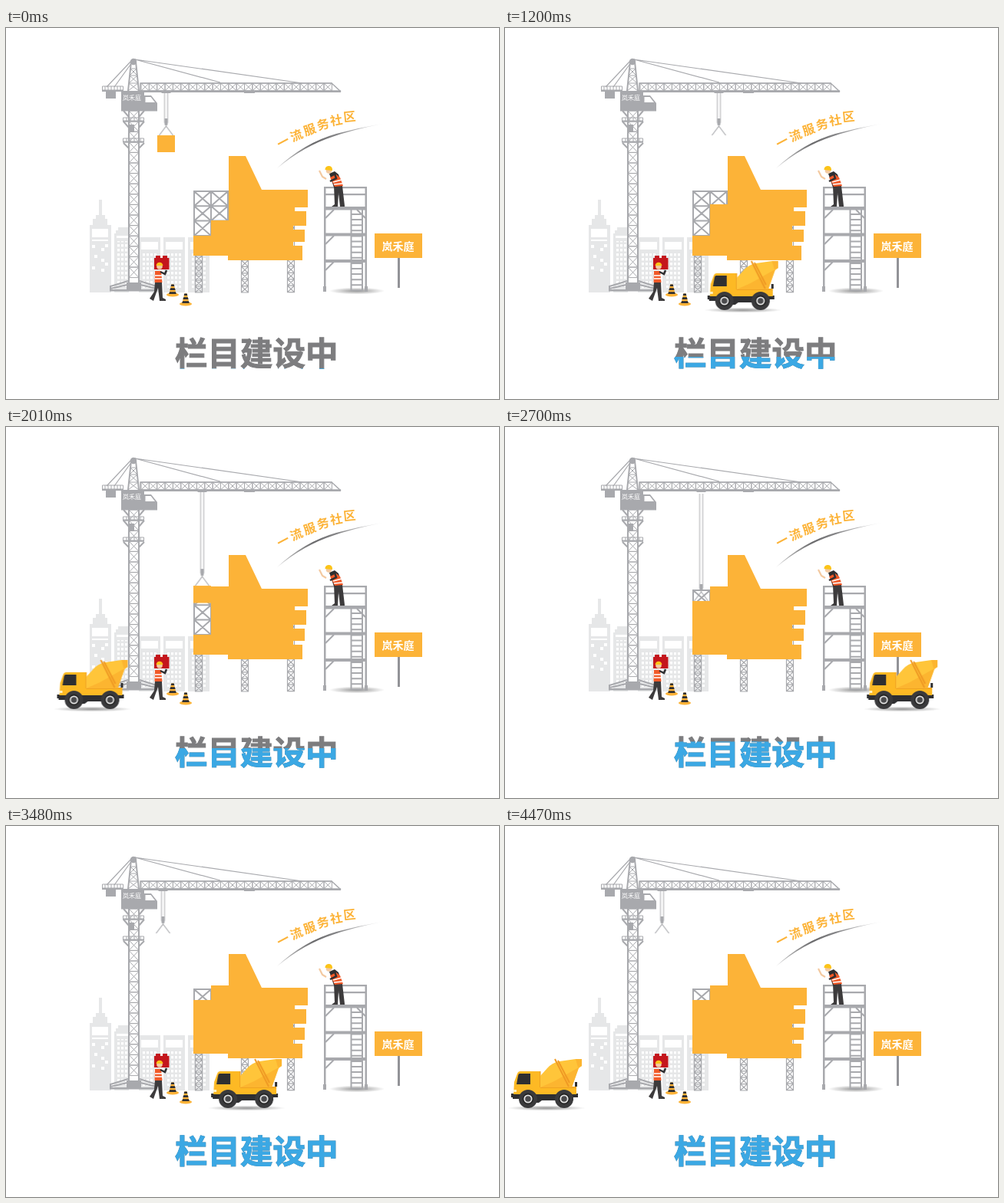
Recreate the animation shown at these times as an HTML page. Size 642 px wide and 484 px high, loop 4.5 s.

```html
<!DOCTYPE html>
<html lang="zh">
<head>
<meta charset="utf-8">
<title>栏目建设中</title>
<style>
html, body { margin: 0; width: 100%; height: 100%; overflow: hidden; background: #fff; }
svg { display: block; width: 100vw; height: 100vh; }
text { font-family: "Noto Sans CJK SC", "Noto Sans CJK", "Noto Sans", sans-serif; }
.steel { fill: none; stroke: #a8a9ad; }
.iron { fill: #a8a9ad; }
.city { fill: #e6e7e8; }
.gold { fill: #fcb338; }
.dark { fill: #2f2f31; }
.cloth { fill: #3d3b3c; }
.title { font-size: 42.5px; font-weight: 900; }

/* One picture every 30 ms; a small lead keeps each step clear of its boundary. */
.trolley, .hook, .block, .truck, .level { animation: 4500ms -2ms infinite step-end; }
.trolley { animation-name: trolley; }
.hook { animation-name: hook; }
.a { animation-name: a; }
.b { animation-name: b; }
.c { animation-name: c; }
.d { animation-name: d; }
.truck { animation-name: truck; }
.level { animation-name: level; }

@keyframes trolley {
  0% { transform: translateX(208.5px); animation-timing-function: steps(14); }
  9.3333% { transform: translateX(278.5px); }
  36% { transform: translateX(278.5px); animation-timing-function: steps(5); }
  39.3333% { transform: translateX(255.5px); }
  66.6667% { transform: translateX(255.5px); animation-timing-function: steps(10); }
  73.3333%, 100% { transform: translateX(204.5px); }
}
@keyframes hook {
  0% { transform: translateY(0); }
  9.3333% { transform: translateY(0); animation-timing-function: steps(13); }
  18% { transform: translateY(90px); animation-timing-function: steps(13); }
  26.6667% { transform: translateY(0); animation-timing-function: steps(7); }
  31.3333% { transform: translateY(68px); animation-timing-function: steps(7); }
  36% { transform: translateY(0); }
  39.3333% { transform: translateY(0); animation-timing-function: steps(13); }
  48% { transform: translateY(109px); animation-timing-function: steps(8); }
  53.3333% { transform: translateY(0); animation-timing-function: steps(10); }
  60% { transform: translateY(87px); animation-timing-function: steps(10); }
  66.6667%, 100% { transform: translateY(0); }
}
@keyframes a {
  0% { transform: translate(197px, 140px); animation-timing-function: steps(14); }
  9.3333% { transform: translate(267px, 140px); animation-timing-function: steps(13); }
  18%, 100% { transform: translate(267px, 230px); }
}
@keyframes b {
  0% { transform: translate(-99px, 0); }
  27.3333% { transform: translate(267px, 149.7px); animation-timing-function: steps(6); }
  31.3333%, 100% { transform: translate(267px, 208px); }
}
@keyframes c {
  0% { transform: translate(-99px, 0); }
  40% { transform: translate(244px, 148.4px); animation-timing-function: steps(12); }
  48%, 100% { transform: translate(244px, 249px); }
}
@keyframes d {
  0% { transform: translate(-99px, 0); }
  54% { transform: translate(244px, 148.7px); animation-timing-function: steps(9); }
  60%, 100% { transform: translate(244px, 227px); }
}
@keyframes truck {
  0% { transform: translateX(-200px); }
  2% { transform: translateX(534px); animation-timing-function: steps(72); }
  50% { transform: translateX(8px); }
  50.6667% { transform: translateX(-200px); }
  54.6667% { transform: translateX(534px); animation-timing-function: steps(67); }
  99.3333%, 100% { transform: translateX(8px); }
}
@keyframes level {
  0% { transform: translateY(41px); animation-timing-function: steps(110); }
  73.3333%, 100% { transform: translateY(0); }
}
</style>
</head>
<body>
<svg viewBox="0 0 642 484">
  <defs>
    <pattern id="panes" width="5" height="6" patternUnits="userSpaceOnUse">
      <rect width="3" height="3.4" fill="#fff"/>
    </pattern>
    <clipPath id="rope"><rect x="-20" y="84" width="40" height="300"/></clipPath>
    <clipPath id="fill"><rect class="level" x="200" y="403" width="260" height="60"/></clipPath>
    <radialGradient id="shade">
      <stop offset=".1" stop-color="#000" stop-opacity=".38"/>
      <stop offset="1" stop-color="#000" stop-opacity="0"/>
    </radialGradient>
    <linearGradient id="brush">
      <stop offset="0" stop-color="#ccc"/>
      <stop offset=".35" stop-color="#6a6a6c"/>
      <stop offset=".6" stop-color="#8a8a8c"/>
      <stop offset="1" stop-color="#eee"/>
    </linearGradient>
    <g id="house">
      <path class="city" d="M0 273h28v72H0z"/>
      <path fill="#fff" d="M3 279h22v10H3z"/>
      <path fill="url(#panes)" d="M3 293h22v46H3z"/>
    </g>
    <g id="cone">
      <ellipse class="gold" cy="5.500" rx="8" ry="2.400"/>
      <path class="gold" d="M-1.600-8h3.200L5 6H-5z"/>
      <path class="dark" d="M-1.700-8h3.400l.6 2.400h-4.600zM-2.800-3.200h5.600l.8 2.800h-7.200zM-4 1.800h8l.8 2.600h-9.600z"/>
    </g>
    <g id="wheel">
      <circle r="12" fill="#3a3a3c"/>
      <circle r="7.200" fill="#222"/>
      <circle r="5.600" fill="#e4e4e4"/>
      <circle r="3.800" fill="#4a4a4c"/>
    </g>
  </defs>

  <!-- skyline -->
  <path class="city" d="M109 345v-88h4v-8h4v-5h4v-20h4v20h4v5h3v8h5v88zM141 345v-77h2v-4h3v-4h14v85z"/>
  <path fill="#fff" d="M112 262h21v11h-21zM112 276h21v2h-21zM144 271h16v3h-16z"/>
  <path fill="#fff" d="M112 283h4v4h-4zM129 282h4v4h-4zM124 287h4v4h-4zM115 296h4v4h-4zM124 301h4v4h-4zM112 311h4v4h-4zM129 306h4v4h-4zM124 314h4v4h-4z"/>
  <path fill="url(#panes)" d="M144 278h16v60h-16z"/>
  <use href="#house" x="173"/><use href="#house" x="205"/><use href="#house" x="237"/>

  <!-- crane -->
  <path id="mast" class="steel"/>
  <path class="steel" stroke-width="2" d="M160 108v225M173 108v225M163 44l-4 38M169 44l4 38"/>
  <path class="steel" d="M162 53h8M161 62h10M160 72h12M162 53l9 9-11 10 13 10M170 53l-9 9 11 10-13 10"/>
  <path class="steel" stroke-width="1.200" d="M168 41l111 30M168 41l218 31M163 43l-32 34M164 45l-23 32"/>
  <circle class="iron" cx="166" cy="44" r="4.200"/>
  <path id="jib" class="steel"/>
  <path class="steel" stroke-width="1.500" d="M175 82V72h249l12 11"/>
  <path class="iron" d="M173 81.200h263v2.800H173zM310 82h14v3h-14zM125 80.500h28v2.500h-28zM130 82h13v10h-13z"/>
  <path class="steel" d="M125.500 81v-5h27v5M129 76v5M133 76v5M137 76v5M141 76v5M145 76v5M149 76v5"/>
  <path class="iron" d="M150 82h30v6h9l8 10v10.500h-47z"/>
  <path fill="#fff" d="M181.500 90h7l5.500 7h-12.500z"/>
  <text x="164" y="93.500" font-size="8" text-anchor="middle" fill="#fff">岚禾庭</text>
  <path class="steel" stroke-width="2" d="M153 108l7 8M180 108l-7 8M153 122l7 8M180 122l-7 8M153 150l7 7M180 150l-7 7"/>
  <path class="steel" d="M152.500 122v-5h27v5zM152.500 149v-5h27v5zM157 117v5M162 117v5M167 117v5M175 117v5M157 144v5M162 144v5M167 144v5M175 144v5"/>
  <path class="iron" d="M152 120.500h28v2h-28zM152 147.500h28v2h-28zM159 126h8v10h-8zM135 341h62v2.500h-62zM157 332h19v10h-19z"/>
  <path class="steel" stroke-width="2" d="M159 330l-23 7v6M174 330l22 7v6M158 335l-22 5M175 335l21 5"/>

  <!-- scaffold -->
  <path id="frame" class="steel" stroke-width="2"/>
  <path id="legs" class="steel" stroke-width="1.200"/>

  <g class="trolley">
    <path class="iron" d="M-6 82H6v3H-6z"/>
    <g clip-path="url(#rope)">
      <g class="hook">
        <path class="steel" d="M-2 0v118M2 0v118"/>
        <path class="iron" d="M-2.500 118h5v5l-1 4h-3l-1-4z"/>
        <path class="steel" stroke-width="1.200" d="M0 126v2l-9 12M0 128l9 12"/>
      </g>
    </g>
  </g>
  <g class="gold">
    <rect class="block a" width="23" height="22"/>
    <rect class="block b" width="23" height="22.500"/>
    <rect class="block c" width="23" height="22.500"/>
    <rect class="block d" width="23" height="22.500"/>
    <path d="M290 167h22l21 44h60v23h-17v5h15v19h-17v5h15v16h-15v5h12v19h-97v-6h-45v-26h23v-20h23z"/>
  </g>

  <!-- slogan -->
  <g id="slogan" class="gold" font-size="16" font-weight="700" text-anchor="middle"></g>
  <path fill="url(#brush)" d="M353 183Q388 150 430 138Q460 130 490 125Q450 133 425 142Q388 154 353 183z"/>

  <!-- lookout -->
  <ellipse cx="457" cy="343" rx="36" ry="4.500" fill="url(#shade)"/>
  <path id="ladder" class="steel" stroke-width="2"/>
  <path class="iron" d="M414 207h2.500v137H414zM467.500 207h2.500v137h-2.500zM414 207h56v2.200h-56zM414 216h56v2.200h-56zM414 233h56v4.500h-56zM414 267.500h56v4h-56zM414 302h56v4h-56zM413 337h4v7h-4zM467 337h4v7h-4z"/>
  <path class="steel" stroke-width="2" d="M416 248l11-11M468 248l-11-11M416 282l11-11M416 316l11-11"/>
  <g>
    <path fill="none" stroke="#f3c9a0" stroke-width="2.200" d="M408 186l4 8 5 3"/>
    <path class="cloth" d="M427 206h11l3 26v1h-6l-2-18-1 18h-8l4-3z"/>
    <path class="dark" d="M421 190l7-3 5 4 5 15-11 2z"/>
    <path fill="#f15a29" d="M422 195l8-4 5 4 4 11-11 1-2-4z"/>
    <path fill="none" stroke="#fff" stroke-width="1.500" d="M426 201l11-3M427 204l11-1"/>
    <path fill="none" stroke="#2f2f31" stroke-width="2.500" d="M428 190l2 6-8 4"/>
    <circle cx="420.500" cy="186" r="3.800" fill="#f3c9a0"/>
    <path fill="#fcc419" d="M415.500 185a4.800 5 0 0 1 9.500-1v2z"/>
  </g>

  <!-- sign -->
  <path fill="#929397" d="M510 300h3v39h-3z"/>
  <path class="gold" d="M480 268h62v32h-62z"/>
  <text x="510.500" y="290" font-size="14" font-weight="900" text-anchor="middle" fill="#fff">岚禾庭</text>

  <!-- carrier and cones -->
  <path fill="#c4161c" d="M193 300h2v-3h6v3h3v-3h6v3h2.500v15H193z"/>
  <path class="cloth" d="M194 331h9l1 21 4 2v2h-8l-2-17-6 17-5-3 6-9z"/>
  <path fill="#f15a29" d="M194 317h8l1.500 15h-10z"/>
  <path stroke="#fff" stroke-width="1.500" d="M194 323h9M194 327h9"/>
  <path fill="none" stroke="#2f2f31" stroke-width="2.500" d="M201 318l6 3 2-5"/>
  <circle cx="200" cy="311" r="3.800" fill="#f3c9a0"/>
  <path fill="#fcc419" d="M195.500 310a4.600 5.500 0 0 1 9 0z"/>
  <use href="#cone" x="217" y="342.500"/><use href="#cone" x="234" y="354.500"/>

  <!-- mixer truck -->
  <g class="truck">
    <ellipse cx="46" cy="368" rx="51" ry="3.500" fill="url(#shade)"/>
    <path class="dark" d="M0 349h87v5h-6v4H40l-4 3h-8v-5H2v-2H0z"/>
    <path fill="#fdb924" d="M3 351l1-17 4-11q1-3 4-3h26v20h47v10H3z"/>
    <path fill="#f0a322" d="M37 320h1.500v21H37zM38 340.500h47v1.500H38z"/>
    <path class="dark" d="M11 323h14v14H7l2-11q.500-3 2-3zM83 334h3v6h-3z"/>
    <path fill="#ffc53a" d="M38 341v-15l9-10q6-7 16-9l21-3h8v9l-4 3-9 25z"/>
    <path fill="#fcb530" d="M38 341l18-8 32-18-9 26zM84 304h8v9l-5 2z"/>
    <path fill="none" stroke="#f09a24" stroke-width="2" d="M57 304l18 36M61 306l15 29"/>
    <path d="M3 344h4v3H3z" fill="#fff3c4"/>
    <use href="#wheel" x="22" y="356"/><use href="#wheel" x="69" y="356"/>
  </g>

  <text class="title" x="220" y="439.500" fill="#7d7d7f" stroke="#7d7d7f">栏目建设中</text>
  <g clip-path="url(#fill)" aria-hidden="true">
    <text class="title" x="220" y="439.500" fill="#3ba8e4" stroke="#3ba8e4">栏目建设中</text>
  </g>
</svg>
<script>
const $ = id => document.getElementById(id);
const draw = (id, d) => $(id).setAttribute('d', d);

// A braced cell, and a run of such cells downwards or to the right.
const cell = (x, y, w, h) =>
  `M${x} ${y}h${w}v${h}h${-w}zl${w} ${h}m0 ${-h}l${-w} ${h}`;

function stack(x, y, w, h, n) {
  let d = '';
  for (let i = 0; i < n; i++) d += cell(x, y + i * h, w, h);
  return d;
}

function row(x, y, w, h, n) {
  let d = '';
  for (let i = 0; i < n; i++) d += cell(x + i * w, y, w, h);
  return d;
}

draw('mast', stack(160, 108, 13, 13.6, 16));
draw('jib', row(176, 72, 10.35, 10, 24));
draw('frame', stack(245, 213, 22, 19.3, 3) + stack(267, 213, 22, 19.3, 2));
draw('legs', stack(246.5, 297, 9, 8, 6) + stack(306.5, 303, 9, 8.4, 5) + stack(366.5, 227, 9, 8.4, 14));

let ladder = 'M449.500 237V343M464 237V343';
for (let y = 243; y < 344; y += 7.1) ladder += `M449.500 ${y}h14.500`;
draw('ladder', ladder);

[...'一流服务社区'].forEach((ch, i) => {
  const x = 361 + i * 17.3, y = 149 - i * 9.1 + i * i * 0.5;
  const t = document.createElementNS('http://www.w3.org/2000/svg', 'text');
  t.textContent = ch;
  t.setAttribute('y', 5.5);
  t.setAttribute('transform', `translate(${x} ${y}) rotate(${-28 + i * 4.4})`);
  $('slogan').append(t);
});
</script>
</body>
</html>
```
